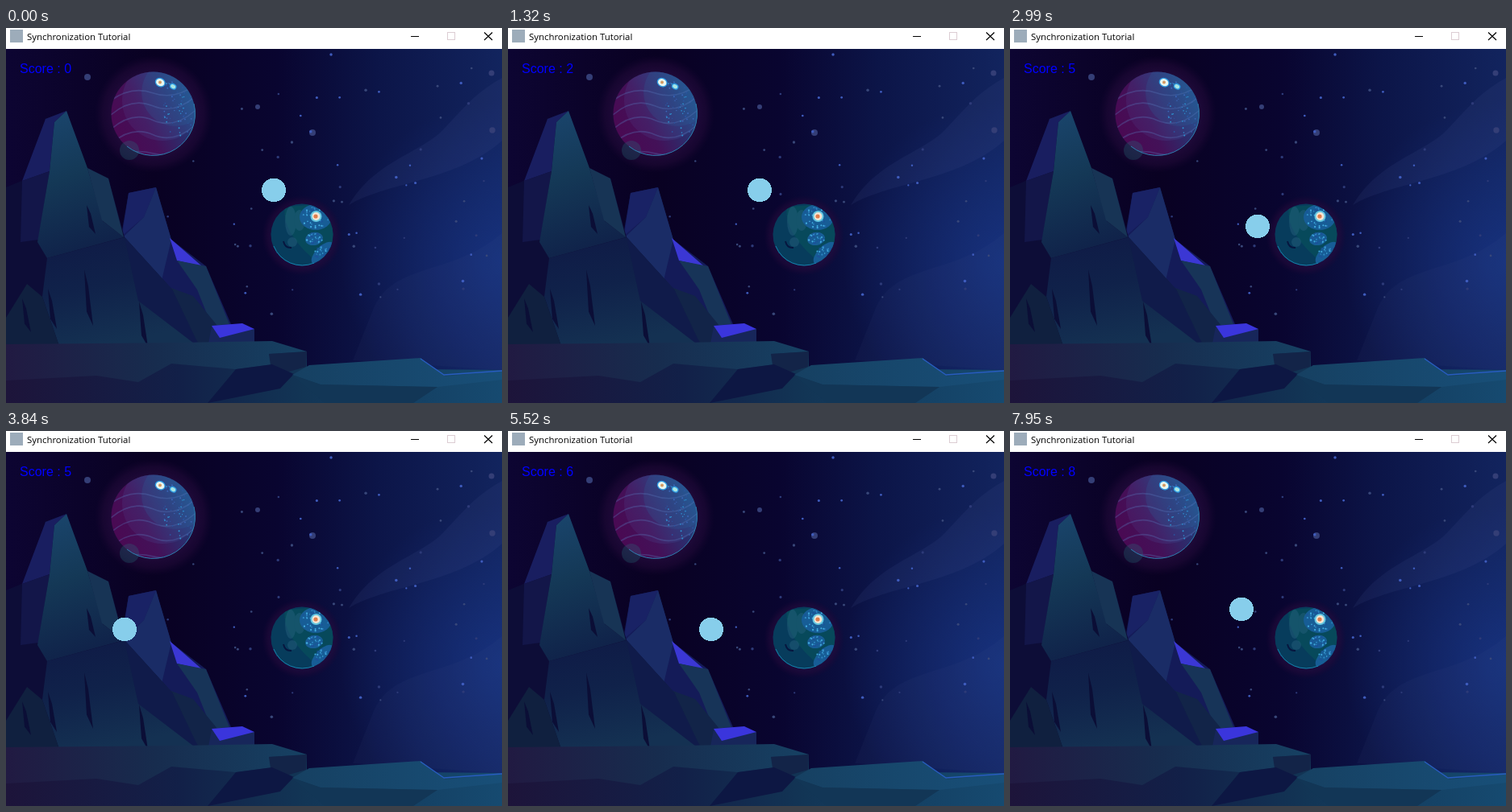
Write an HTML page that moves like this. It is 615 px wide and 466 px high and loops after 8 s.

```html
<!DOCTYPE html>
<html lang="en">
<head>
<meta charset="utf-8">
<title>Synchronization Tutorial</title>
<style>
html, body { margin: 0; width: 100%; height: 100%; overflow: hidden; background: #0a0226; }
svg { display: block; width: 100vw; height: 100vh; }
.title { font: 11.4px "Open Sans", "Noto Sans", sans-serif; }
.score { font: 16px "Liberation Sans", Arial, sans-serif; fill: #00f; }
</style>
</head>
<body>
<svg viewBox="0 0 615 466">
  <defs>
    <linearGradient id="sky">
      <stop offset="0" stop-color="#0d0532"/><stop offset=".3" stop-color="#090122"/>
      <stop offset=".55" stop-color="#090530"/><stop offset=".75" stop-color="#0c1548"/>
      <stop offset="1" stop-color="#12245e"/>
    </linearGradient>
    <radialGradient id="glow" gradientUnits="userSpaceOnUse" cx="615" cy="290" r="200">
      <stop offset="0" stop-color="#1c3f9c" stop-opacity=".5"/><stop offset="1" stop-color="#1c3f9c" stop-opacity="0"/>
    </radialGradient>
    <radialGradient id="halo">
      <stop offset=".6" stop-color="#30104a" stop-opacity=".7"/><stop offset=".86" stop-color="#240a3a" stop-opacity=".5"/>
      <stop offset="1" stop-color="#1c0634" stop-opacity="0"/>
    </radialGradient>
    <linearGradient id="violet" x1="0" y1=".75" x2="1" y2=".3">
      <stop offset="0" stop-color="#4b0852"/><stop offset=".4" stop-color="#431158"/>
      <stop offset=".75" stop-color="#29306f"/><stop offset="1" stop-color="#1c4f86"/>
    </linearGradient>
    <linearGradient id="veil" x1="0" y1=".8" x2="1" y2=".2">
      <stop offset="0" stop-color="#52307c" stop-opacity=".25"/><stop offset="1" stop-color="#2364a0" stop-opacity=".55"/>
    </linearGradient>
    <linearGradient id="peak" x1="0" y1="0" x2=".2" y2="1">
      <stop offset="0" stop-color="#1a466e"/><stop offset=".5" stop-color="#143856"/><stop offset="1" stop-color="#10234a"/>
    </linearGradient>
    <linearGradient id="foot" x1="0" y1="0" x2=".3" y2="1">
      <stop offset="0" stop-color="#0f1a46"/><stop offset=".5" stop-color="#10224a"/><stop offset="1" stop-color="#143152"/>
    </linearGradient>
    <linearGradient id="land" gradientUnits="userSpaceOnUse" x1="0" y1="0" x2="615" y2="0">
      <stop offset="0" stop-color="#211a42"/><stop offset=".3" stop-color="#172c4e"/>
      <stop offset=".6" stop-color="#164163"/><stop offset="1" stop-color="#184f78"/>
    </linearGradient>
    <linearGradient id="lowland" gradientUnits="userSpaceOnUse" x1="0" y1="0" x2="615" y2="0">
      <stop offset="0" stop-color="#1d143a"/><stop offset=".35" stop-color="#122048"/>
      <stop offset=".6" stop-color="#123555"/><stop offset="1" stop-color="#164a70"/>
    </linearGradient>
    <clipPath id="disc1"><circle cx="182.5" cy="106.5" r="52"/></clipPath>
    <clipPath id="disc2"><circle cx="367" cy="257" r="38.5"/></clipPath>
  </defs>

  <rect width="615" height="466" fill="url(#sky)"/>
  <rect y="26" width="615" height="440" fill="url(#glow)"/>
  <g fill="#4a5794">
    <path d="M615 62C575 84 560 110 535 133C500 160 455 170 425 220C470 192 560 190 615 140Z" opacity=".13"/>
    <path d="M455 350C480 290 550 310 615 255V425L430 413Z" opacity=".07"/>
  </g>
  <g id="stars" fill="#343e76">
    <circle cx="101" cy="61" r="4"/><circle cx="380" cy="130" r="4"/><circle cx="603" cy="127" r="3.7"/>
    <circle cx="602" cy="56" r="3.5"/><circle cx="312" cy="98" r="3"/>
  </g>

  <circle cx="183" cy="107" r="73" fill="url(#halo)"/>
  <circle cx="182.5" cy="106.5" r="52" fill="url(#violet)"/>
  <g clip-path="url(#disc1)" fill="none">
    <circle cx="194" cy="90" r="50" fill="url(#veil)"/>
    <circle cx="210" cy="80" r="42" fill="#2869a0" opacity=".2"/>
    <g id="veins" stroke="#5979bd" stroke-width="1.6" opacity=".33"/>
    <g id="sparks"/>
  </g>
  <circle cx="153" cy="152" r="12" fill="#23727c" opacity=".28"/>
  <path d="M150 147A52 52 0 0 0 233 94" fill="none" stroke="#2c7fae"/>
  <g stroke="#2f9de4" stroke-width="1.3">
    <ellipse cx="191.5" cy="67.5" rx="6" ry="5" fill="#e9f6ef" transform="rotate(25 191 67)"/>
    <ellipse cx="207.5" cy="72.5" rx="3.8" ry="3" fill="#a8e6e4" transform="rotate(30 207 72)"/>
  </g>
  <circle cx="191" cy="67.5" r="2" fill="#d59961"/>

  <circle cx="367" cy="258" r="50" fill="url(#halo)"/>
  <circle cx="367" cy="257" r="38.5" fill="#073c5c"/>
  <g clip-path="url(#disc2)">
    <path d="M346 222C342 246 360 268 380 286L408 292V218Z" fill="#09545c" opacity=".55"/>
    <g fill="#28627e" opacity=".45">
      <ellipse cx="353" cy="240" rx="7" ry="18"/><ellipse cx="364" cy="239" rx="7" ry="13"/>
      <circle cx="355" cy="266" r="6"/>
    </g>
    <path d="M344 265Q346 274 354 273" fill="none" stroke="#06163f" stroke-width="2"/>
    <g id="craters" fill="#175d96">
      <ellipse cx="384" cy="235" rx="20" ry="16"/>
      <ellipse cx="382" cy="262" rx="11" ry="8" transform="rotate(-10 382 262)"/>
      <ellipse cx="393" cy="280" rx="18" ry="9" transform="rotate(-45 393 280)"/>
    </g>
    <circle cx="384.5" cy="234" r="7" fill="#65c8e2"/>
    <circle cx="384.5" cy="234" r="5" fill="#f3e6d5"/>
    <circle cx="384" cy="234" r="2.6" fill="#e07d4c"/>
  </g>
  <path d="M332 271A38 38 0 0 0 382 292" fill="none" stroke="#1681ad"/>

  <!-- rear peak -->
  <path fill="#141b58" d="M152 205L186 198L205 263L248 296L292 398H120L143 257Z"/>
  <path fill="#192265" d="M152 205L186 198L171 235L144 258Z"/>
  <path fill="#1a2c66" d="M186 198L205 263L191 322L146 259L171 235Z"/>
  <path fill="#3b37d4" d="M203 261L243 296L212 289Z"/>
  <path fill="#173458" d="M212 289L248 296L277 368L255 370L237 325Z"/>
  <path fill="#122448" d="M191 318L232 333L285 398H230Z"/>
  <!-- front peak -->
  <path fill="#0d0d37" d="M0 198L53 176L48 113L75 103L101 174L127 187L147 260L206 325L241 398H0Z"/>
  <path fill="#191e60" d="M49 113L75 103L60 117L54 178L20 190Z"/>
  <path fill="#131649" d="M20 190L54 178L40 263L18 266Z"/>
  <path fill="url(#peak)" d="M75 103L60 117L54 178L39 266L51 286L146 260L120 240L101 174Z"/>
  <path fill="#173455" d="M101 174L127 187L146 260L119 239Z"/>
  <path fill="url(#foot)" d="M51 286L147 260L206 325L241 398H67L45 334Z"/>
  <path fill="#101b4a" d="M147 260L206 325L241 398L164 339Z"/>
  <path fill="#10203f" d="M26 318L45 334L67 398H0V360Z"/>
  <g id="cracks" fill="#0b0e36"/>
  <!-- ledge and ground -->
  <path fill="#17265a" d="M255 371L308 374V397H250Z"/>
  <path fill="#3a35dc" d="M255 370L293 367L308 374L265 385Z"/>
  <path fill="url(#lowland)" d="M0 393L373 402V423L615 425V466H0Z"/>
  <path fill="url(#land)" d="M0 393L214 391L330 389L373 402L326 405L330 418L285 424L205 417L164 440L112 432L0 438Z"/>
  <path fill="#132448" d="M326 405L373 402L372 421L330 433Z"/>
  <path fill="#0d1743" d="M285 424L330 418L357 430L340 448L250 466Z"/>
  <path fill="url(#land)" d="M355 431L376 419L514 410L545 433L615 426V437L535 446L390 443Z"/>
  <path fill="#123656" d="M355 431L390 443L535 446L505 466H395Z"/>
  <path fill="none" stroke="#285cc0" stroke-width="1.3" d="M514 411L543 431L615 426"/>

  <rect width="615" height="26" fill="#fff"/>
  <rect x="5" y="2" width="16" height="16" fill="#9dacba"/>
  <text class="title" x="26" y="15">Synchronization Tutorial</text>
  <g fill="none" stroke="#000">
    <path d="M502 10.5H512" shape-rendering="crispEdges"/>
    <path d="M593 5.5L603 15M603 5.5L593 15" stroke-width="1.2"/>
    <rect x="547.5" y="5.5" width="9" height="9" stroke="#dccdd3"/>
  </g>
  <text class="score" id="score" x="17" y="56">Score : 0</text>
  <ellipse id="ball" rx="15" ry="14.7" fill="#87ceeb" shape-rendering="crispEdges"/>
</svg>
<script>
const $ = id => document.getElementById(id);

let seed = 7;
function random(min, max) {
  seed = (seed * 16807) % 2147483647;
  return min + (max - min) * seed / 2147483647;
}

function add(parent, tag, attrs) {
  const el = document.createElementNS("http://www.w3.org/2000/svg", tag);
  for (const key in attrs) el.setAttribute(key, attrs[key]);
  parent.appendChild(el);
}

function scatter(id, count, place, size, colors) {
  for (let i = 0; i < count; i++) {
    const [cx, cy] = place();
    add($(id), "circle", { cx, cy, r: random(size * 0.6, size), fill: colors[i % colors.length] });
  }
}

function around(cx, cy, rx, ry) {
  const angle = random(0, 2 * Math.PI), reach = Math.sqrt(random(0, 1));
  return [cx + rx * reach * Math.cos(angle), cy + ry * reach * Math.sin(angle)];
}

function drawDetails() {
  scatter("stars", 65, () => [random(200, 615), random(32, 360)], 1.8, ["#3f5cbd", "#384779", "#2d3a78"]);
  scatter("sparks", 70, () => around(214, 96, 20, 42), 1, ["#2d91d0", "#3b66b8", "#2a55a0"]);
  for (const [cx, cy, rx, ry] of [[384, 235, 18, 14], [382, 262, 10, 7], [393, 280, 11, 11]]) {
    scatter("craters", rx * 3, () => around(cx, cy, rx, ry), 1.2, ["#42aee0", "#1c4f9a", "#2f86c4"]);
  }
  for (let y = 75; y < 150; y += 18) {
    const bend = random(12, 24);
    add($("veins"), "path", { d: `M130 ${y + 15}q26 ${-bend} 52 ${-bend / 2}t52 ${-bend / 2}` });
  }
  for (const [x, y, height] of [[100, 220, 36], [97, 300, 70], [52, 324, 50], [20, 336, 42], [165, 340, 56]]) {
    add($("cracks"), "path", { d: `M${x} ${y}l5 ${height * 0.3}l6 ${height * 0.7}l-8 ${-height * 0.25}Z` });
  }
}

const LOOP = 8000, STRIDE = 15;
const headings = { left: [-1, 0], right: [1, 0], up: [0, -1], down: [0, 1] };

// Each run: heading, first step, last step, distance.
const runs = [
  ["left", 70, 620, 155], ["right", 850, 1320, 135], ["up", 1570, 1810, 75], ["down", 2040, 2460, 120],
  ["left", 2990, 3300, 80], ["left", 3460, 4240, 160], ["left", 4300, 4370, 30],
  ["right", 4540, 5210, 165], ["right", 5400, 5520, 45], ["right", 5750, 5890, 35],
  ["down", 5960, 6180, 55], ["down", 6340, 6520, 55], ["down", 6700, 6820, 40],
  ["up", 7050, 7240, 65], ["up", 7410, 7660, 75], ["up", 7830, 7950, 35]
];

// Full strides on a steady beat; the first step takes up the remainder.
function travelled(t, from, to, distance) {
  if (t >= to) return distance;
  const steps = Math.ceil(distance / STRIDE);
  const beat = Math.floor((t - from) / (to - from) * (steps - 1) + 0.25);
  return distance - STRIDE * (steps - 1 - beat);
}

// Every turn scores a point.
function stateAt(t) {
  let x = 332, y = 201, score = 0, last = "";
  for (const [heading, from, to, distance] of runs) {
    if (t < from) break;
    const [dx, dy] = headings[heading], d = travelled(t, from, to, distance);
    x += dx * d;
    y += dy * d;
    if (heading !== last) score++;
    last = heading;
  }
  return { x, y, score };
}

function draw(now) {
  const { x, y, score } = stateAt(now % LOOP);
  $("ball").setAttribute("cx", x);
  $("ball").setAttribute("cy", y + 0.5);
  $("score").textContent = "Score : " + score;
}

drawDetails();
const start = performance.now();
function tick() {
  draw(performance.now() - start);
  requestAnimationFrame(tick);
}
tick();
</script>
</body>
</html>
```
